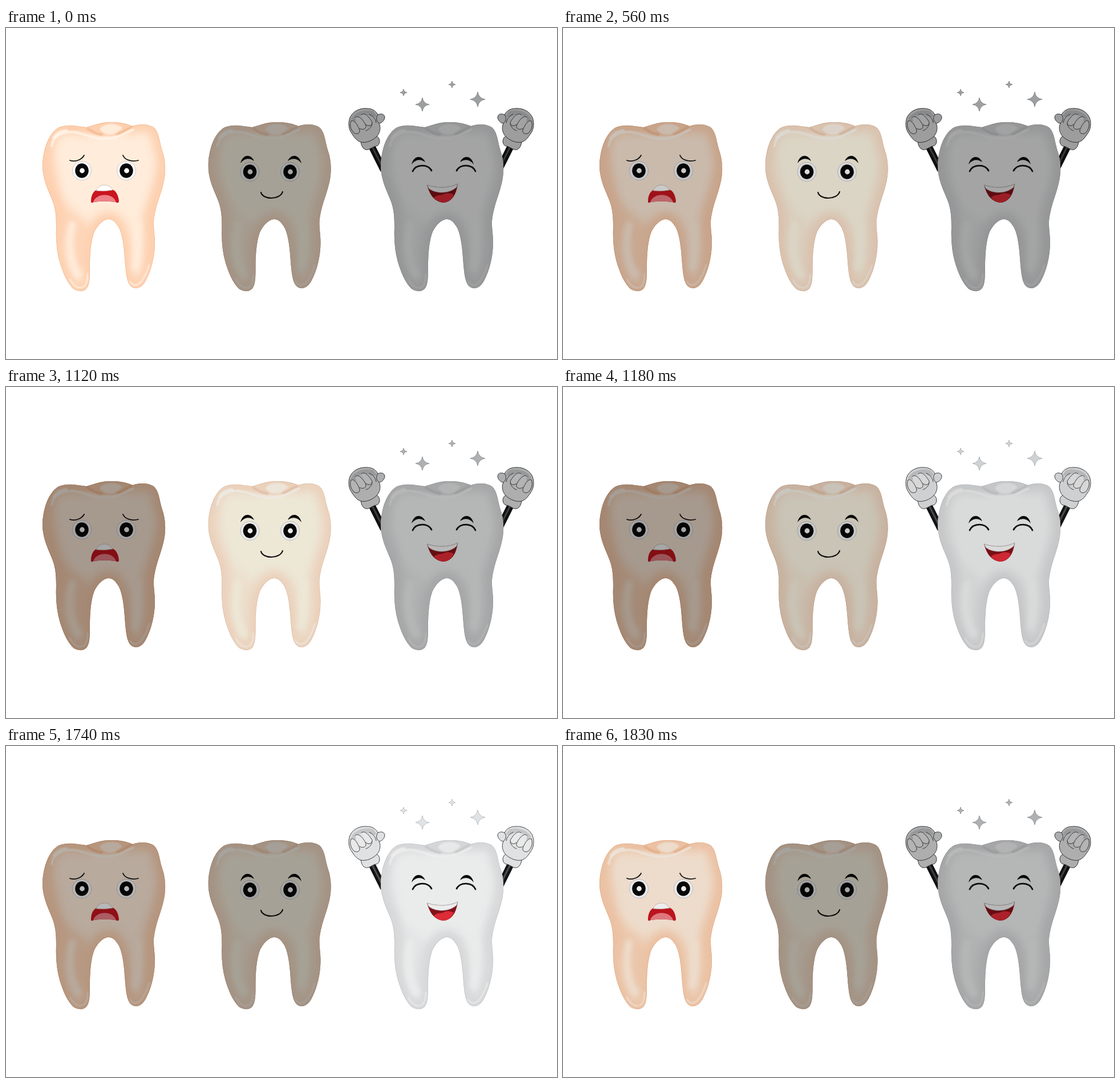
An HTML page that plays this animation: 966 by 580 pixels, repeating every 1860 ms.

```html
<!DOCTYPE html>
<html lang="en">
<head>
<meta charset="utf-8">
<title>Three teeth</title>
<style>
  html, body { margin: 0; width: 100%; height: 100%; overflow: hidden; background: #fff; }
  svg { display: block; width: 100%; height: 100%; }
  .line { fill: none; stroke: #111; stroke-linecap: round; }
  .soft1 { filter: blur(1.2px); }
  .soft4 { filter: blur(4px); }
  .soft8 { filter: blur(8px); }
</style>
</head>
<body>
<svg id="stage" viewBox="0 0 966 580"></svg>
<script>
const OUTLINE = `M64 240C65 214 74 184 93 174C109 168 124 172 141 174C155 170 166 165 185 165
  C202 165 212 168 222 172C233 168 250 167 260 175C269 184 269 200 274 215C279 229 281 248 277 268
  C272 291 264 307 260 330C257 345 261 360 261 375C261 400 255 424 245 443C238 455 230 458 223 455
  C213 451 211 436 209 415C207 385 205 365 198 350C192 340 187 335 179 335C170 336 161 345 155 357
  C149 372 147 395 147 420C147 435 147 450 141 457C135 463 125 462 118 457C107 447 99 427 94 410
  C89 392 87 372 88 350C88 330 87 318 82 304C76 287 64 268 64 240Z`;

const path = (d, attrs) => `<path d="${d}" ${attrs}/>`;
const fill = (d, color, cls = '') => path(d, `fill="${color}" class="${cls}"`);
const line = (d, width) => path(d, `class="line" stroke-width="${width}"`);
const tint = (d, color, width, cls) =>
  path(d, `fill="none" stroke="${color}" stroke-width="${width}" stroke-linecap="round" class="${cls}"`);

// Crown, roots and shading, drawn at the first tooth's place and shifted by dx.
function body(dx, { base, shade, deep, shine, patch }) {
  return `<g transform="translate(${dx} 0)"><g clip-path="url(#tooth)">
    ${fill(OUTLINE, base)}
    ${tint(OUTLINE, shade, 26, 'soft8')}
    ${fill('M60 190C82 205 88 250 94 290C104 320 128 322 150 350L142 420L120 430L80 330L58 260Z', shade, 'soft8" opacity="' + patch)}
    ${fill('M285 215C262 240 262 290 244 320C236 350 250 390 236 440L262 420L270 310Z', shade, 'soft8" opacity="' + patch)}
    ${tint('M116 345C108 375 112 410 126 432', base, 13, 'soft4')}
    ${tint('M232 345C228 370 232 395 226 420', base, 12, 'soft4')}
    ${fill('M96 176C120 168 140 176 150 172C166 163 204 160 224 172C211 178 206 188 184 189C160 191 150 180 128 179C114 179 106 182 96 187Z', shade, 'soft1')}
    ${tint('M143 176C152 182 158 186 168 187M220 174C210 177 205 184 195 186', deep, 3.5, 'soft1')}
    ${fill('M164 178C168 166 198 165 204 176C196 182 190 188 181 187C174 187 169 183 164 178Z', shine, 'soft1" opacity=".75')}
    ${tint('M80 207C82 190 96 184 112 182C132 181 148 194 170 194C194 195 205 185 223 178', shine, 3.5, 'soft1')}
    ${tint('M84 193C89 185 98 180 106 180', shine, 5, 'soft1')}
    ${tint('M112 440C120 455 130 458 137 453C142 448 143 439 143 431M217 444C223 454 233 452 240 440C245 432 249 423 251 415', shine, 2, 'soft1')}
    ${tint(OUTLINE, deep, 1.4, '')}
  </g></g>`;
}

const eye = (x, y) => `
  <circle cx="${x}" cy="${y}" r="16.5" fill="#fcfcfd" stroke="#c9c9cc" stroke-width="1"/>
  <ellipse cx="${x}" cy="${y}" rx="11.8" ry="12.8" fill="#070707"/>
  <circle cx="${x + .5}" cy="${y}" r="4.4" fill="#fff"/>`;

const brow = (x, y, flip) => path('M0 13C4 -3 18 -4 24 9C16 3 7 4 0 13Z',
  `fill="#080808" transform="translate(${x} ${y}) scale(${flip} 1)"`);

const worried =
  line('M112 232C120 235 132 232 137 223M205 223C208 231 220 235 232 232', 1.8) +
  eye(133, 250) + eye(211, 250) +
  fill('M149 304C149 291 155 284 161 283L186 283C193 285 197 293 198 304Q197 308 192 305Q172 302 154 305Q149 308 149 304Z', '#c9151f') +
  fill('M153 305C158 289 187 288 193 305Q172 302 153 305Z', '#ee8188') +
  path('M158 285C163 272 181 272 187 284Q172 287 158 285Z', 'fill="#fff" stroke="#b9a9a0" stroke-width=".7"');

const calm =
  brow(411, 224, 1) + brow(518, 224, -1) +
  eye(427.5, 252) + eye(498, 252) +
  line('M447 288C450 301 480 302 485 287', 2.2);

const happy =
  brow(711, 226, 1) + brow(820, 226, -1) +
  line('M713 251C719 238 740 238 746 250M790 250C796 238 817 238 823 251', 2.8) +
  fill('M738 275C755 281 777 281 792 273C789 294 781 305 766 306C751 304 743 293 738 275Z', '#8d1219') +
  fill('M750 297C757 291 764 294 768 291C774 288 781 290 785 292C781 302 774 306 766 306C760 305 754 302 750 297Z', '#ee2e3b') +
  path('M738 275C755 281 777 281 792 273L790 279C777 291 753 291 741 281Z', 'fill="#fff" stroke="#9b9b9d" stroke-width=".6"');

const arm = `
  <path d="M641 207L662 249" stroke="#161616" stroke-width="12"/>
  <path d="M642 208L662 248" stroke="#55575a" stroke-width="3"/>
  <g fill="#f1f2f3" stroke="#45474a" stroke-width="1" stroke-linejoin="round" stroke-linecap="round">
    <path d="M622 199C630 201 643 194 649 189Q655 192 655 199Q654 206 649 207C641 208 637 215 630 213Q623 210 622 199Z"/>
    <path d="M607 186C599 177 600 162 604 155C610 144 623 140 633 141C643 141 649 146 652 152C658 149 664 151 664 157C663 163 658 167 654 167C658 175 655 185 650 190C643 197 632 202 622 200C614 197 611 192 607 186Z"/>
    <path fill="#d3d5d7" stroke="none" d="M605 160C610 147 630 141 644 146L650 154C644 160 637 151 628 151C620 153 614 157 612 166Z"/>
    <path fill="#fafafa" d="M605 163C610 160 616 169 620 179C621 186 613 187 609 183C604 177 602 169 605 163ZM612 157C618 151 627 162 631 171C632 178 624 179 620 176M623 152C630 147 637 157 642 165C642 172 635 173 631 169"/>
    <path fill="none" d="M652 152C648 157 649 163 654 167M637 151C644 154 648 160 649 166M631 180C637 178 641 173 642 168"/>
  </g>`;

function sparkle(x, y, r) {
  const k = r * .13;
  const d = `M0 ${-r}Q${k} ${-k} ${r} 0Q${k} ${k} 0 ${r}Q${-k} ${k} ${-r} 0Q${-k} ${-k} 0 ${-r}Z`;
  return path(d, `transform="translate(${x} ${y})" fill="#f1f4f6" stroke="#c5cacd" stroke-width=".9"`);
}

const palettes = [
  { base: '#ffecda', shade: '#fdcfae', deep: '#f4b991', shine: '#fff4e8', patch: .75 },
  { base: '#fff8e6', shade: '#fde0c9', deep: '#efcbb0', shine: '#fffcf4', patch: .3 },
  { base: '#fcfdfd', shade: '#e5e6e8', deep: '#d3d5d7', shine: '#ffffff', patch: .3 }
];

const stage = document.getElementById('stage');
stage.innerHTML = `
  <defs><clipPath id="tooth"><path d="${OUTLINE}"/></clipPath></defs>
  <g class="figure">${body(0, palettes[0])}${worried}</g>
  <g class="figure">${body(290.5, palettes[1])}${calm}</g>
  <g class="figure">
    ${sparkle(697, 113, 6)}${sparkle(730, 134, 12)}${sparkle(782, 99, 6)}${sparkle(827, 125, 13)}
    ${arm}<g transform="translate(1526 0) scale(-1 1)">${arm}</g>
    ${body(593, palettes[2])}${happy}
  </g>`;

const figures = [...stage.querySelectorAll('.figure')];
const LOOP = 1860, HOLD = 500, STEP = 30, STEPS = 5, DIM = .65;
const fades = [HOLD, 1120, 1740];

// Each fade passes the light on to the next tooth in five even steps.
function draw(time) {
  const t = time % LOOP;
  const light = [0, 0, 0];
  let lit = 0, mix = 0;
  fades.forEach((start, i) => {
    if (t >= start) {
      lit = i;
      mix = Math.min(1, (Math.floor((t - start) / STEP) + 1) / STEPS);
    }
  });
  light[lit] = 1 - mix;
  light[(lit + 1) % 3] = mix;
  figures.forEach((figure, i) => {
    figure.style.filter = `brightness(${DIM + (1 - DIM) * light[i]})`;
  });
}

const began = performance.now();
function tick() {
  draw(performance.now() - began);
  requestAnimationFrame(tick);
}
tick();
</script>
</body>
</html>
```
